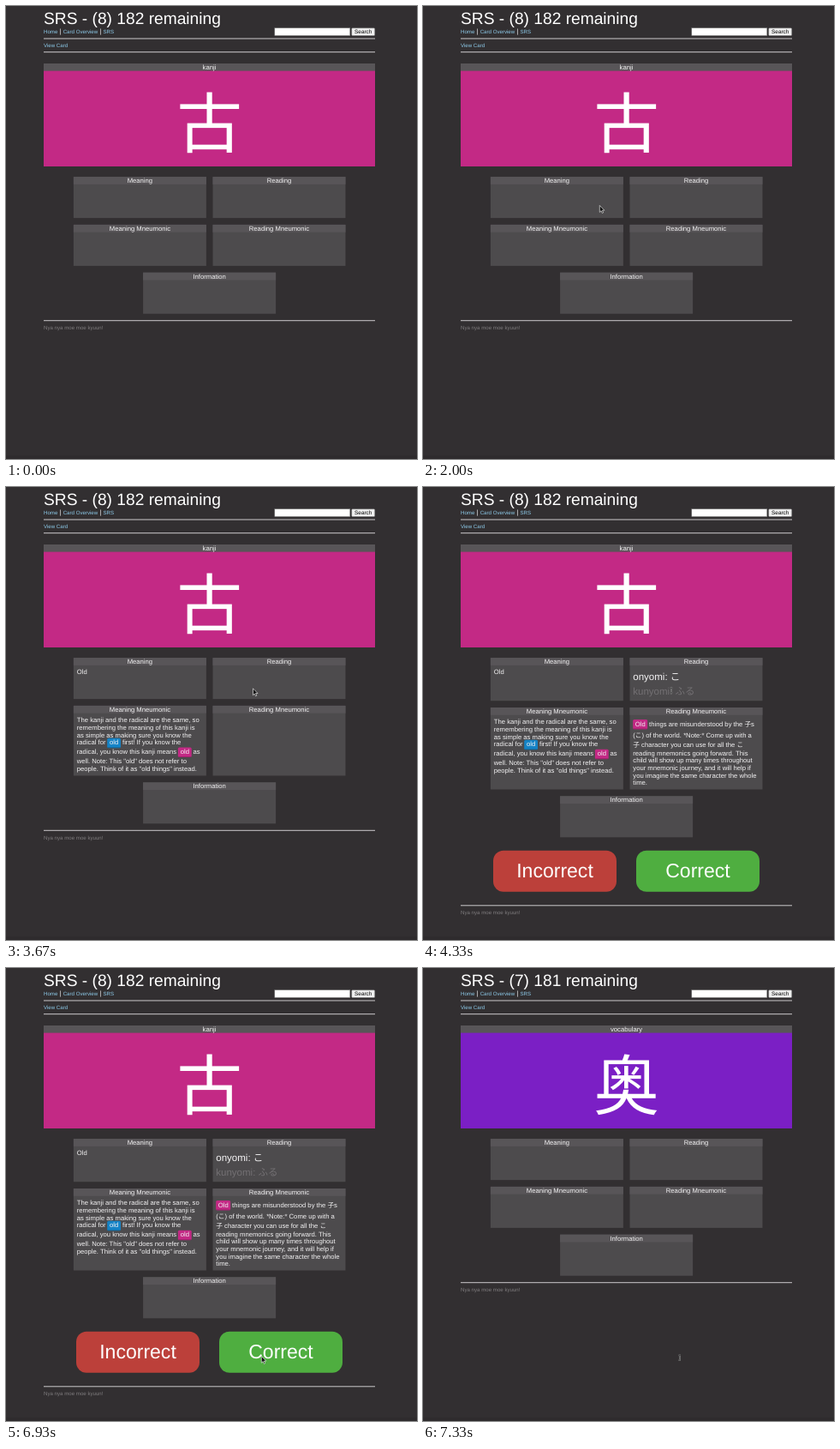
These frames come from a looping animation (480x528 px, 8000 ms). An HTML page:

```html
<!DOCTYPE html>
<html lang="ja">
<head>
<meta charset="utf-8">
<title>SRS</title>
<style>
  html, body { margin: 0; width: 100%; height: 100%; overflow: hidden; background: #322f31; }
  svg { display: block; width: 480px; height: 528px; }
  text {
    font-family: "Liberation Sans", Arial, "Noto Sans CJK JP", "Noto Sans CJK", sans-serif;
    font-size: 7.68px; fill: #f4f3f4; white-space: pre; text-rendering: geometricPrecision;
  }
  .small { font-size: 6.144px; }
  .link { fill: #8ecbea; }
  .foot { fill: #7f7c7e; }
  .mid { text-anchor: middle; }
  .title { font-size: 19.2px; fill: #fff; }
  .sub { font-size: 11.52px; }
  .dim { fill: #737073; }
  .big { font-size: 23.04px; fill: #fff; }
  .glyph { font: 76.8px "Noto Sans CJK JP", "Noto Sans CJK", sans-serif; fill: #fff; }
  .btn { font-size: 6.4px; fill: #000; }
</style>
</head>
<body>
<svg id="stage" viewBox="0 0 480 528" lang="ja"></svg>
<script>
const LOOP = 8000;
const BLUE = '#1583c6', PINK = '#c32985', PURPLE = '#7b1fc5';
const stage = document.getElementById('stage');

const rect = (x, y, w, h, fill, extra = '') =>
  `<rect x="${x}" y="${y}" width="${w}" height="${h}" fill="${fill}" ${extra}/>`;
const text = (x, y, s, cls = '') => `<text x="${x}" y="${y}" class="${cls}">${s}</text>`;
const rule = y => rect(44, y - 0.5, 387, 1, '#cbc9cb');

const card = (x, y, h, name) =>
  rect(x, y, 155, h, '#4d4b4d') + rect(x, y, 155, 8.8, '#585558') +
  text(x + 77.5, y + 6.8, name, 'mid');

const badge = (x, y, w, s, fill) =>
  rect(x, y - 7.6, w, 11.5, fill, 'rx="1.5"') +
  rect(x + 0.5, y + 2.9, w - 1, 1, '#000', 'opacity=".2"') +
  text(x + w / 2, y, s, 'mid');

const button = (x, y, s, fill) =>
  rect(x, y, 144, 48, fill, 'rx="12"') + text(x + 72, y + 31.4, s, 'big mid');

function header(title) {
  return text(44, 20.7, title, 'title') +
    text(44, 31.8, 'Home', 'small link') + text(62.5, 31.8, '|') +
    text(66.7, 31.8, 'Card Overview', 'small link') + text(109.4, 31.8, '|') +
    text(113.5, 31.8, 'SRS', 'small link') +
    rect(313.8, 25.7, 88, 8.8, '#fff', 'stroke="#767676" stroke-width=".5"') +
    rect(403.7, 25.7, 27, 8.8, '#efefef', 'rx="1" stroke="#767676" stroke-width=".5"') +
    text(417.2, 32.3, 'Search', 'btn mid') +
    rule(38) + text(44, 48.1, 'View Card', 'small link') + rule(53.7);
}

function meaning(y) {
  const lines = [
    [19.4, 'The kanji and the radical are the same, so'],
    [28.2, 'remembering the meaning of this kanji is'],
    [36.9, 'as simple as making sure you know the'],
    [45.4, 'radical for'],
    [56.3, 'radical, you know this kanji means'],
    [67.3, 'well. Note: This "old" does not refer to'],
    [76.1, 'people. Think of it as "old things" instead.']
  ];
  return text(82.8, 218.4, 'Old') +
    lines.map(([dy, s]) => text(82.8, y + dy, s)).join('') +
    badge(118.2, y + 45.4, 15.8, 'old', BLUE) +
    text(136, y + 45.4, 'first! If you know the') +
    badge(200.9, y + 56.3, 15.8, 'old', PINK) +
    text(218.6, y + 56.3, 'as');
}

function reading(y) {
  const lines = [
    [34.9, '(こ) of the world. *Note:* Come up with a'],
    [46.1, '子 character you can use for all the こ'],
    [55.6, 'reading mnemonics going forward. This'],
    [64.4, 'child will show up many times throughout'],
    [73.1, 'your mnemonic journey, and it will help if'],
    [81.8, 'you imagine the same character the whole'],
    [90.4, 'time.']
  ];
  return text(245.3, 225, 'onyomi: こ', 'sub') +
    text(245.3, 242, 'kunyomi: ふる', 'sub dim') +
    badge(245.2, y + 21.5, 17, 'Old', PINK) +
    text(264.1, y + 21.5, 'things are misunderstood by the 子s') +
    lines.map(([dy, s]) => text(245.3, y + dy, s)).join('');
}

// step: 0 all hidden, 1 meaning shown, 2 everything shown
function page(title, kind, glyph, colour, step) {
  const gap = 7.8, y1 = 199.1;
  const h1 = step === 2 ? 50.1 : 48;
  const h2 = [48, 81.6, 95.5][step];
  const y2 = y1 + h1 + gap, y3 = y2 + h2 + gap, end = y3 + 48;
  const line = end + (step === 2 ? 79.5 : 8);
  return '<g visibility="hidden">' + header(title) +
    rect(44, 67, 387, 120, colour) + rect(44, 67, 387, 8.6, '#585558') +
    text(237.5, 73.5, kind, 'mid') + text(237.6, 164.7, glyph, 'glyph mid') +
    card(78.9, y1, h1, 'Meaning') + card(241.5, y1, h1, 'Reading') +
    card(78.9, y2, h2, 'Meaning Mneumonic') + card(241.5, y2, h2, 'Reading Mneumonic') +
    card(160.1, y3, 48, 'Information') +
    (step > 0 ? meaning(y2) : '') +
    (step > 1 ? reading(y2) + button(82, end + 15.5, 'Incorrect', '#bc403a') +
      button(249, end + 15.5, 'Correct', '#4fae40') : '') +
    rule(line) + text(44, line + 10.2, 'Nya nya moe moe kyuun!', 'small foot') + '</g>';
}

const first = step => page('SRS - (8) 182 remaining', 'kanji', '古', PINK, step);
stage.innerHTML = rect(0, 0, 480, 528, '#322f31') + rect(0, 524, 480, 4, '#2e2b2d') +
  first(0) + first(1) + first(2) +
  page('SRS - (7) 181 remaining', 'vocabulary', '奥', PURPLE, 0) +
  `<g id="pointer">
    <path id="arrow" d="M0 0V7.8L1.8 6.2 3 8.9 4.3 8.3 3.1 5.7H5.5Z" fill="#111" stroke="#fff" stroke-width=".6"/>
    <g id="beam" fill="none">
      <path d="M.3 -.8H2.7M1.5 -.8V4.8M.3 4.8H2.7" stroke="#bbb" stroke-width="1.5"/>
      <path d="M.3 -.8H2.7M1.5 -.8V4.8M.3 4.8H2.7" stroke="#111" stroke-width=".7"/>
    </g>
  </g>`;

const pages = [...stage.children].filter(e => e.tagName === 'g' && !e.id);
const [pointer, arrow, beam] = ['pointer', 'arrow', 'beam'].map(id => document.getElementById(id));
const starts = [0, 2800, 4330, 7000];

// time, x, y
const path = [
  [1400, 447, 382], [1600, 360, 322], [1800, 250, 254], [2000, 206.3, 232.5],
  [3200, 206.3, 232.5], [3330, 235, 233], [3450, 275, 234.5], [3530, 288, 235], [3670, 288.5, 234.8],
  [4330, 288.5, 235], [4600, 287, 252], [4900, 281, 290], [5130, 277.5, 329], [5200, 276.7, 341],
  [5400, 318, 388], [5600, 377, 432], [5780, 325, 448], [5930, 299, 449.5],
  [6670, 299, 449.5], [6900, 298.3, 452.4], [8000, 298.3, 452.4]
];

function locate(t) {
  const i = Math.max(1, path.findIndex(p => p[0] >= t));
  const [a, b] = [path[i - 1], path[i]];
  const k = (t - a[0]) / (b[0] - a[0]);
  return [1, 2].map(n => a[n] + (b[n] - a[n]) * k);
}

function isBeam(t, y) {
  if (t >= 7000) return true;
  return t >= 4330 && t < 5130 && (y < 247 || y > 268);
}

function draw() {
  const t = performance.now() % LOOP;
  const now = starts.filter(s => s <= t).length - 1;
  pages.forEach((p, i) => p.setAttribute('visibility', i === now ? 'visible' : 'hidden'));
  pointer.style.display = t < path[0][0] ? 'none' : '';
  if (t >= path[0][0]) {
    const [x, y] = locate(t);
    const text = isBeam(t, y);
    pointer.setAttribute('transform', `translate(${x} ${y})`);
    arrow.style.display = text ? 'none' : '';
    beam.style.display = text ? '' : 'none';
  }
  requestAnimationFrame(draw);
}
draw();
</script>
</body>
</html>
```
